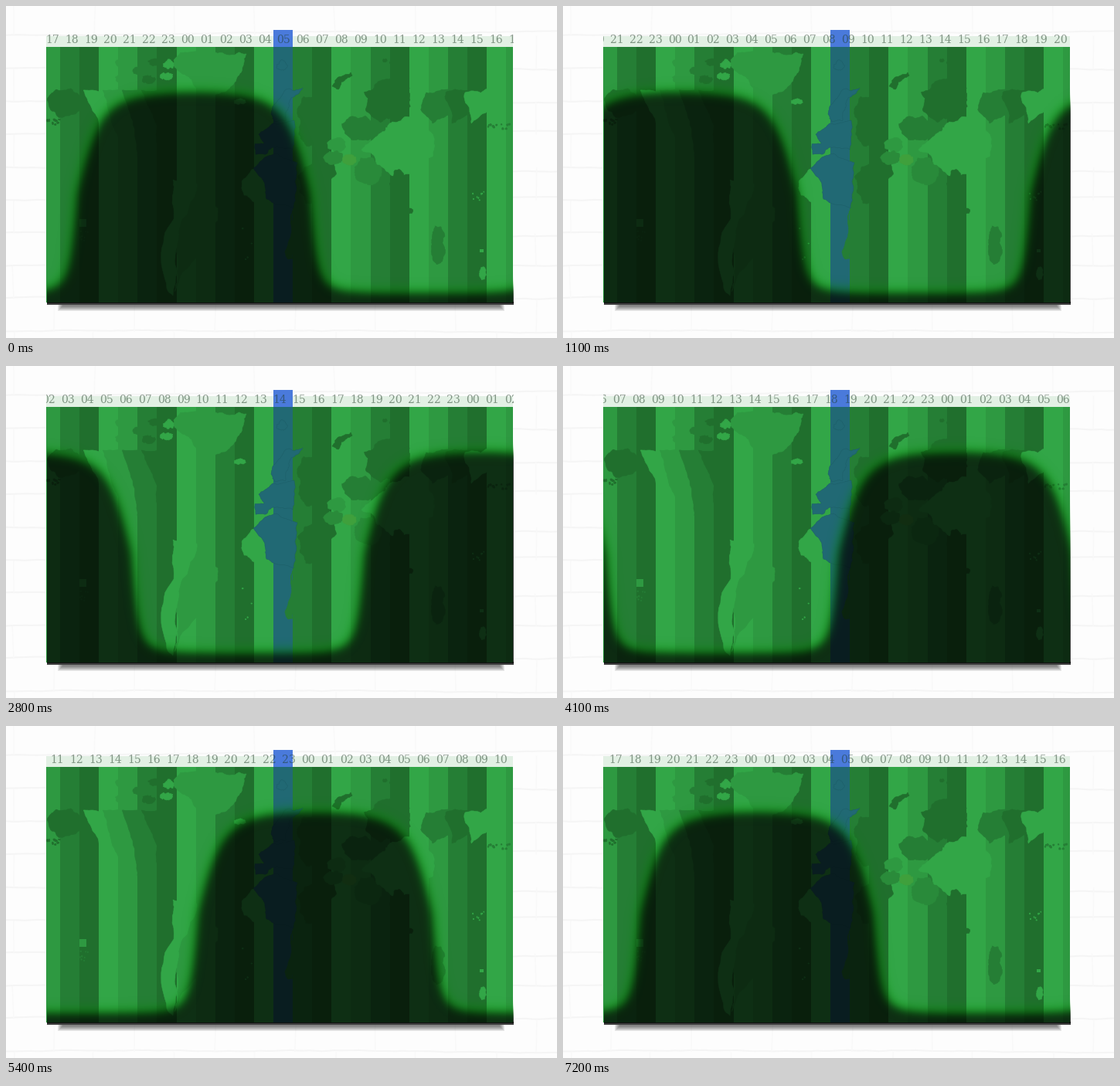
These frames come from a looping animation (713x430 px, 7300 ms). A matplotlib script:

```python
import numpy as np
import matplotlib.pyplot as plt
from matplotlib.animation import FuncAnimation
from matplotlib.patches import Polygon, Rectangle

W, H, DPI = 713, 430, 100
FRAMES, INTERVAL = 73, 100
LEFT, RIGHT, TOP, BOTTOM = 52, 656, 52.5, 384
COL0, COL_W = 346, 25.1            # left edge of the UTC+1 column
WORLD = 604                        # width of one day of night shade
LABEL_X, LABEL_W = 60.1, 24.95     # first hour label and spacing
SHADES = ["#32a647", "#2e9941", "#257e35", "#206f2d"]
TEAL = "#216974"
rng = np.random.default_rng(5)

fig = plt.figure(figsize=(W / DPI, H / DPI), dpi=DPI, facecolor="#fdfdfd")
ax = fig.add_axes([0, 0, 1, 1])
ax.set_xlim(0, W)
ax.set_ylim(H, 0)
ax.axis("off")


def rect(x0, y0, x1, y1, color, z=1, **kw):
    return ax.add_patch(Rectangle((x0, y0), x1 - x0, y1 - y0, fc=color, lw=0, zorder=z, **kw))


def clip_box(x0, y0, x1, y1):
    return Rectangle((x0, y0), x1 - x0, y1 - y0, transform=ax.transData)


def col(zone):
    return COL0 + COL_W * (zone - 1)


def zone_color(zone):
    return TEAL if zone == 1 else SHADES[zone % 4]


# ---- brick wall ----
def wall():
    for row in range(11):
        y = 38 + 42.6 * row
        xs = np.linspace(0, W, 90)
        ys = y + np.cumsum(rng.normal(0, 0.3, 90))
        ax.plot(xs, ys, color="#f5f5f5", lw=1.4, zorder=0)
        for x in np.arange(10 + 52 * (row % 2), W, 104):
            ax.plot([x, x + rng.normal(0, 1.2)], [y, y - 41], color="#f9f9f9", lw=1, zorder=0)


# ---- panel, columns and header ----
def panel():
    for i in range(7):
        rect(67 + i, 387, 645 - i, 394.5 - i, "black", 0.5, alpha=0.085)
    rect(53, 383, 657.3, 387.2, "#3f3f3f", 0.8)
    rect(LEFT, 38.5, RIGHT, TOP, "#e2f0e4")
    for zone in range(-11, 14):
        rect(max(LEFT, col(zone)), TOP, min(RIGHT, col(zone + 1)), BOTTOM, zone_color(zone))
    rect(col(1), 31, col(2), TOP, "#4a7adb", 2)


wall()
panel()
map_box = clip_box(LEFT, TOP, RIGHT, BOTTOM)


# ---- land: a few key points with a random coast ----
def rough(pts, amount):
    for _ in range(4):
        nxt = np.roll(pts, -1, axis=0)
        edge = nxt - pts
        normal = np.column_stack([-edge[:, 1], edge[:, 0]])
        mid = (pts + nxt) / 2 + normal * rng.normal(0, amount, (len(pts), 1))
        pts = np.stack([pts, mid], axis=1).reshape(-1, 2)
    return pts


def land(zone, *pts, color=None, amount=0.09):
    color = color or zone_color(zone)
    edge = "#1d5f69" if zone == 1 else color
    patch = ax.add_patch(Polygon(rough(np.array(pts, float), amount), fc=color, ec=edge,
                                 lw=0.4, zorder=3))
    patch.set_clip_path(map_box)


def blob(zone, x, y, w, h, **kw):
    a = np.arange(8) * np.pi / 4 + 0.3
    r = rng.uniform(0.88, 1.12, 8)
    land(zone, *np.column_stack([x + w / 2 * r * np.cos(a), y + h / 2 * r * np.sin(a)]), **kw)


def islets(zone, x, y, dx, dy, n, size=2):
    for px, py in rng.uniform((x, y), (x + dx, y + dy), (n, 2)):
        w, h = rng.uniform(0.5, 1, 2) * size
        blob(zone, px, py, w, h, amount=0.15)


def americas():
    for zone, foot in zip(range(-8, -4), (196, 214, 235, 200)):
        x = col(zone) - 20
        land(zone, (x, 109), (x + 28, 109), (x + 42, foot - 30), (x + 26, foot),
             (x + 20, foot - 45), amount=0.05)
    blob(-9, 76, 126, 46, 36)
    islets(-9, 53, 146, 16, 8, 8, 4)
    for x in rng.uniform(120, 212, 9):
        zone = round((x - COL0) / COL_W) + 1
        blob(zone, x, rng.uniform(72, 104), 17, 10, amount=0.16)
    land(-3, (217, 70), (262, 57), (311, 62), (298, 95), (268, 118), (252, 125), (240, 95))
    blob(0, 303, 124, 16, 7)
    land(-4, (216, 225), (247, 230), (247, 290), (222, 310), (216, 375), (208, 366), (217, 262),
         amount=0.05)
    land(-3, (247, 240), (274, 262), (268, 290), (228, 345), (218, 370), (224, 300), amount=0.06)


def europe_africa():
    land(0, (336, 205), (318, 212), (305, 228), (308, 245), (322, 255), (336, 250))
    land(1, (320, 210), (335, 196), (350, 191), (377, 203), (376, 235), (372, 262), (348, 256),
         (337, 250), (334, 228), amount=0.05)
    land(2, (371, 265), (369, 295), (361, 318), (365, 328), (371, 327), amount=0.05)
    land(1, (322, 179), (334, 178), (327, 166), (345, 152), (373, 148), (371, 186), (345, 183),
         (336, 192), (323, 192), amount=0.07)
    land(1, (343, 140), (352, 122), (362, 108), (384, 106), (372, 118), (362, 148), (348, 150))
    blob(1, 357, 77, 14, 12, amount=0.15)
    blob(3, 393, 150, 34, 70)
    blob(3, 392, 230, 28, 52)
    blob(3, 410, 212, 34, 36)


def asia_oceania():
    land(3, (422, 104), (428, 94), (446, 86), (448, 90), (434, 98), (430, 108))
    for zone in range(10, 13):
        x = col(zone) - 28
        land(zone, (x, 112), (x + 40, 108), (x + 38, 132), (x + 8, 152))
    blob(7, 494, 121, 58, 58)
    islets(7, 490, 66, 18, 18, 4, 8)
    blob(6, 458, 158, 46, 34)
    blob(5, 428, 180, 24, 18)
    blob(3, 424, 196, 24, 20, color="#2a8b3a")
    blob(5, 468, 214, 34, 36, color="#298a3a")
    blob(4, 444, 199, 18, 14, color="#3fa03c")
    land(8, (460, 186), (478, 170), (500, 150), (532, 142), (552, 166), (552, 195), (535, 215),
         (500, 220), (480, 205))
    blob(7, 508, 230, 20, 40)
    islets(7, 502, 250, 24, 24, 6, 9)
    blob(10, 560, 309, 19, 50)
    blob(12, 617, 346, 9, 17)


americas()
europe_africa()
asia_oceania()
rect(94.5, 276, 104, 286, SHADES[1], 3)
rect(613, 315, 617.5, 319, SHADES[0], 3)
islets(-10, 95, 290, 12, 14, 10)
islets(-10, 621, 153, 34, 6, 12, 3)
islets(12, 603, 240, 16, 12, 8)
islets(0, 306, 275, 12, 64, 4)


# ---- night shade: blurred day line, tiled twice ----
def night_image(sigma=7.5):
    c = np.cos(2 * np.pi * ((np.arange(WORLD) + 0.5) / WORLD - 0.5))
    bend = np.where(c > 0, 0.36, 0.11)     # rounder at the top than at the foot
    curve = 242 - 130 * c * np.sqrt((1 + bend ** 2) / (c ** 2 + bend ** 2))
    mask = np.clip(np.arange(H)[:, None] + 1 - curve, 0, 1)
    fy, fx = np.fft.fftfreq(H)[:, None], np.fft.fftfreq(WORLD)
    kernel = np.exp(-2 * (np.pi * sigma) ** 2 * (fx ** 2 + fy ** 2))
    m = np.clip(np.fft.ifft2(np.fft.fft2(mask) * kernel).real, 0, 1)[53:385]
    rgba = np.zeros(m.shape + (4,))
    rgba[..., 1] = 0.58 * (1 - m) ** 1.3
    rgba[..., 3] = np.clip(0.72 * m + 0.85 * m * (1 - m), 0, 1)
    return np.tile(rgba, (1, 2, 1))


night = ax.imshow(night_image(), extent=(0, 2 * WORLD, 385, 53), aspect="auto",
                  interpolation="bilinear", zorder=5)
night.set_clip_path(clip_box(53, 53, 657, 385))
ax.set_xlim(0, W)
ax.set_ylim(H, 0)

# ---- hour labels ----
band = clip_box(51.5, 30, 605, 53) if False else clip_box(51.5, 30, 656.5, 53)
labels = []
for _ in range(26):
    t = ax.text(0, 48.3, "", family="DejaVu Serif", size=14 * 72 / DPI, color="#1c3a22",
                alpha=0.5, ha="center", va="baseline", zorder=6, clip_on=True)
    t.set_clip_path(band)
    labels.append(t)


def draw(i):
    midnight = 243 - WORLD * i / FRAMES
    x0 = LEFT - WORLD + (midnight - WORLD / 2 - LEFT) % WORLD
    night.set_extent((x0, x0 + 2 * WORLD, 385, 53))
    shift = 24 * LABEL_W * i / FRAMES
    first = int(np.ceil((shift - 20) / LABEL_W))
    for n, t in enumerate(labels, first):
        t.set_x(LABEL_X + LABEL_W * n - shift)
        t.set_text(f"{(17 + n) % 24:02d}")
    return [night, *labels]


anim = FuncAnimation(fig, draw, frames=FRAMES, interval=INTERVAL, repeat=True, repeat_delay=0)
plt.show()
```
